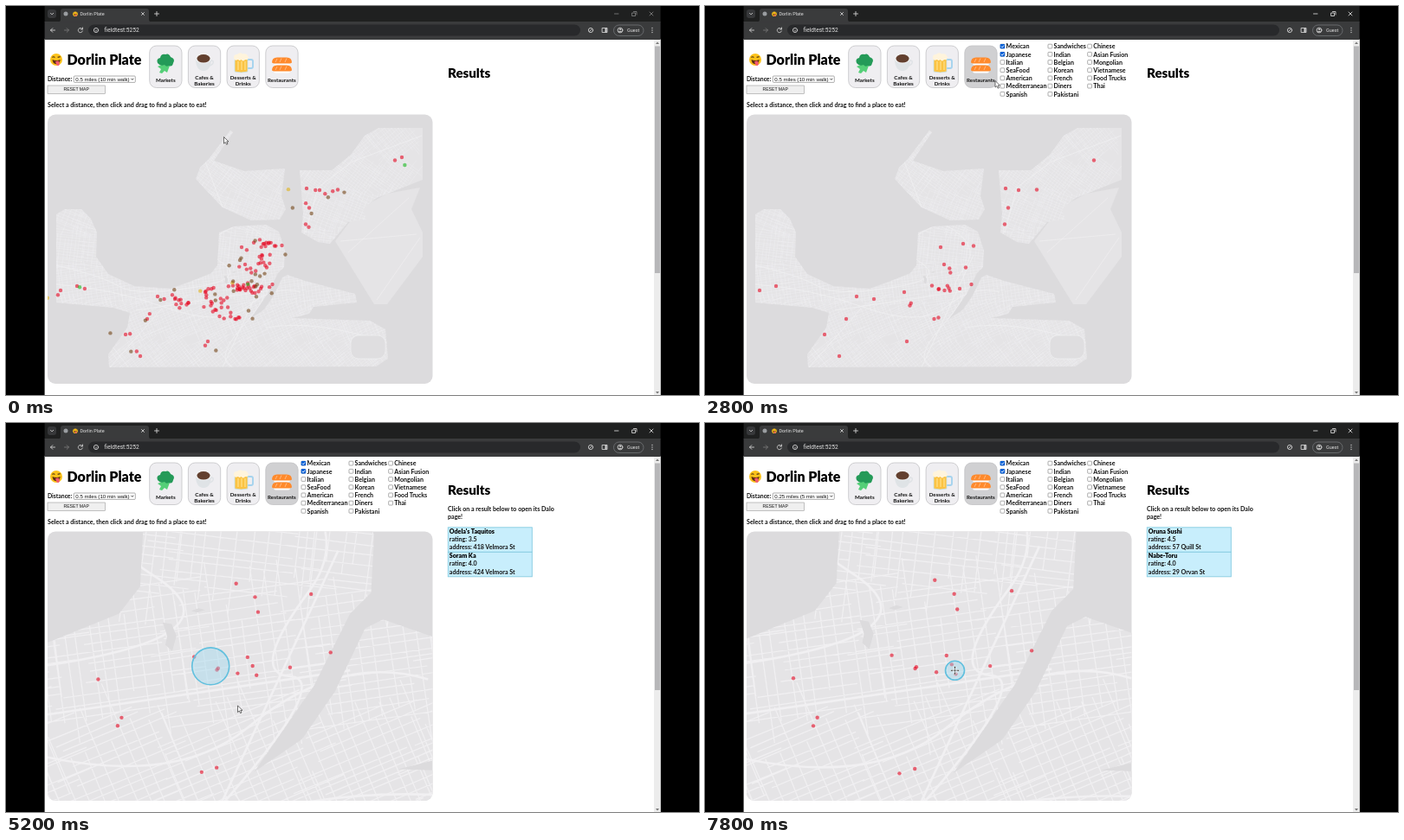
Animation, 800 px wide and 450 px high, one loop 8000 ms. Source, as an HTML page:

```html
<!DOCTYPE html>
<html lang="en">
<head>
<meta charset="utf-8">
<title>Dorlin Plate</title>
<style>
html, body { margin: 0; width: 100%; height: 100%; overflow: hidden; background: #000; }
svg { display: block; width: 100%; height: 100%; }
text { font: 700 7.1px Lato, sans-serif; fill: #111; white-space: pre; }
.head { font-weight: 900; fill: #000; }
.title { font-size: 16px; }
.results { font-size: 15.1px; }
.card { font-size: 6.2px; text-anchor: middle; }
.sys { font: 400 6.1px "Liberation Sans", Arial, sans-serif; }
.reset { font-size: 5.1px; text-anchor: middle; }
.bar { font: 400 5.5px Roboto, sans-serif; fill: #e3e3e3; }
.url { font-size: 6.6px; }
.line { fill: none; stroke: #d0d0d0; stroke-width: .9; stroke-linecap: round; stroke-linejoin: round; }
.road { fill: none; stroke: #f1f0f2; stroke-linejoin: round; }
.land { fill: #e5e4e6; }
</style>
</head>
<body>
<svg viewBox="0 0 800 450">
  <defs>
    <clipPath id="frame"><rect x="48" y="125.5" width="444.5" height="311.5" rx="9"/></clipPath>
    <clipPath id="shore"><use href="#land"/></clipPath>
    <g id="face">
      <circle r="7" fill="#fcc21b"/>
      <path d="M-4.6-2.5q1.6-1.6 3 .2M1.6-2.6l3-.8" fill="none" stroke="#5b3a12" stroke-width="1.2"/>
      <path d="M-4.5 0Q0 2 4.8 0Q4 5.2 0 5.2T-4.5 0" fill="#5f3010"/>
      <path d="M-1 2.2q3-1.6 4.2 0l.7 3.2q-1.2 2.4-3.4 1.2z" fill="#f2596f"/>
    </g>
  </defs>

  <rect x="44.6" y="38" width="711" height="412" fill="#fff"/>
  <g id="chrome">
    <rect x="44.6" width="711" height="19" fill="#1f2020"/>
    <rect x="44.6" y="18" width="711" height="21" fill="#3a3b3c"/>
    <rect x="48" y="4" width="10" height="10" rx="3" fill="#37383a"/>
    <path d="M60 18.5q3 0 3-3V6q0-3 3-3h96q3 0 3 3v9.5q0 3 3 3z" fill="#3a3b3c"/>
    <circle cx="69" cy="9" r="2.5" fill="#9a9da1"/>
    <use href="#face" transform="translate(80 9.2)scale(.4)"/>
    <rect x="95" y="21.5" width="568" height="13" rx="6.5" fill="#28292b"/>
    <rect x="701.5" y="22" width="34.5" height="12.5" rx="6.2" fill="none" stroke="#85888c" stroke-width=".6"/>
    <g class="line">
      <path d="M51.5 8.3l1.6 1.6 1.6-1.6M156.5 7.5l3 3m0-3l-3 3M174 6.5v5m-2.5-2.5h5"/>
      <path id="controls" d="M702.5 9h4.5M723 8h3.5v3.5H723zM724.5 6.5h3.5v3.5M743 7l4 4m0-4l-4 4"/>
      <path d="M56.5 28h-5m2.3-2.3L51.5 28l2.3 2.3"/>
      <path d="M67.5 28h5m-2.3-2.3l2.3 2.3-2.3 2.3" stroke="#777"/>
      <path d="M88 26.500a2.600 2.600 0 1 0 .4 2.500M88.500 25v2h-2"/>
      <circle cx="104" cy="28" r="2.6"/><path d="M104 27.900v1.200"/>
      <circle cx="675" cy="28" r="2.6"/><path d="M673.5 29.5l3-3"/>
      <rect x="688.5" y="25.5" width="5.5" height="5"/><path d="M692.5 26v4" stroke-width="2"/>
      <circle cx="709" cy="28" r="2.9"/><circle cx="709" cy="27" r=".8"/><path d="M707.3 29.8q1.7-1.2 3.4 0"/>
      <path d="M746 25.5v.1m0 2.4v.1m0 2.4v.1" stroke-width="1.3"/>
    </g>
    <text class="bar" x="85.5" y="11.3">Dorlin Plate</text>
    <text class="bar url" x="113.5" y="30.3">fieldtest:5252</text>
    <text class="bar" x="717" y="30">Guest</text>
    <rect x="748" y="39" width="7.6" height="411" fill="#ececec"/>
    <rect x="749" y="46.5" width="6" height="262.5" fill="#b7b7b9"/>
    <path d="M750 44l2-2.5 2 2.5zM750 446l2 2.5 2-2.5z" fill="#777"/>
  </g>

  <use href="#face" x="58" y="62"/>
  <text class="head title" x="70.5" y="67.5">Dorlin Plate</text>
  <text class="head results" x="510" y="83">Results</text>
  <text x="48" y="87" style="font-size:6.8px">Distance:</text>
  <rect x="78.3" y="81" width="71" height="7.4" rx="1" fill="#fff" stroke="#777" stroke-width=".6"/>
  <text id="choice" class="sys" x="80.3" y="86.9"></text>
  <path d="M144.3 83.8l1.5 1.6 1.5-1.6" fill="none" stroke="#222" stroke-width=".8"/>
  <rect x="48" y="92" width="66.3" height="9.300" fill="#efefef" stroke="#999" stroke-width=".6"/>
  <text class="sys reset" x="81.2" y="98.4">RESET MAP</text>
  <text x="48" y="116.5">Select a distance, then click and drag to find a place to eat!</text>
  <g id="cards"></g>
  <g id="icons">
    <path d="M184 66l-9 4 4 3-2 4 3 1 3-3 3 2 3-8z" fill="#55cf78"/>
    <path d="M175 66q-2-5 3-6 1-5 6-4 4-2 6 3 6 2 3 7-1 5-5 3-3 2-5-1-5 2-8-2" fill="#249a58"/>
    <path d="M219 60h18q0 15-9 15t-9-15" fill="#dfe3e6"/>
    <path d="M236 63q5 0 2.5 4-2 2-4 2" fill="none" stroke="#dfe3e6" stroke-width="1.5"/>
    <ellipse cx="228" cy="60.5" rx="9" ry="6" fill="#f4f5f6"/><ellipse cx="228" cy="60.8" rx="7.6" ry="4.8" fill="#63402f"/>
    <path d="M278 62h5q2 0 2 2v6q0 2-2 2h-5" fill="none" stroke="#a5d3ee" stroke-width="1.9"/>
    <path d="M264 60h15v16q-7.5 2-15 0z" fill="#fbc343" stroke="#c5e3f4" stroke-width=".8"/>
    <path d="M268 64v10m4-10v10m4-10v10" stroke="#ffdc7c" stroke-width="1.5"/>
    <path d="M263 61q-1-5 4-5 3-3 6-.6 6-1.4 7 4.6-1 3-4 2-2 3-4.500 0-2 2-3.500 0-4 2-5-1" fill="#fff4dc"/>
    <g id="sushi">
      <rect x="309" y="64" width="19" height="4.5" rx="2.2" fill="#fff"/>
      <path d="M307 65.500q0-6 6-6h11q6 0 6 6l-2 1h-19z" fill="currentColor"/>
      <path d="M313 61l-2 4m7-4.500l-2 4.500m8-4.500l-2 4.500" stroke="#fff" stroke-opacity=".4"/>
    </g>
    <use href="#sushi" y="9" color="#e53935"/>
  </g>
  <g id="filters"></g>

  <g clip-path="url(#frame)">
    <rect x="48" y="125" width="445" height="313" fill="#dcdbdd"/>
    <g id="map">
      <path id="land" class="land" d="M58 241L68 235 87 235 98 246 105 262 104 290 118 310 148 324 190 327 215 318 237 309 244 300 246 262 263 255 300 253 315 261 322 283 321 302 314 309 302 333 282 362 298 351 309 335 319 314 325 311 345 318 403 333 405 343 355 348 350 356 330 361 420 364 438 374 441 408 427 417 119 418 118 403 140 372 143 355 124 349 58 343z
        M219 200L224 187 234 177 259 144 262 146 240 179 275 191 322 188 318 220 323 235 316 247 283 248 250 233 230 212z
        M339 190L376 190 398 172 414 150 430 141 481 141 481 201 428 222 412 235 416 247 395 250 374 275 360 273 341 262 343 240z"/>
      <path class="land" d="M413 232L440 217 478 210 468 235 481 262 481 290 440 345 425 345 380 272 395 252z"/>
      <path class="road" stroke-width=".6" d="M386 272L474 264M395 285L465 222M428 340L478 268"/>
      <g clip-path="url(#shore)">
        <path id="streets" class="road" stroke-width=".34"/>
        <path class="road" stroke-width=".75" d="M58 300Q110 312 130 324T215 326 248 296 262 256M58 322Q120 326 185 349T280 347 340 331M275 252Q320 275 300 302T294 330 272 372 268 420M120 418L180 350M300 372Q360 362 440 390M346 262L360 210 400 180 480 150M230 180L250 233M150 352L314 328M250 418L310 288"/>
        <path fill="#dcdbdd" d="M251.5 312l3 .5 1.6 4-1.4 5-2.3-2 .6-3zM261 308.2l2.5-1 2.2.6-2.7.9z"/>
        <rect x="398" y="381" width="40" height="27" rx="9" fill="#dfdee0" stroke="#f0eff1" stroke-width=".7"/>
      </g>
    </g>
    <g id="dots" fill-opacity=".58"></g>
    <circle id="reach" stroke="#62c0de" stroke-width="1.6"/>
  </g>

  <g id="hint"><text x="510" y="102.3">Click on a result below to open its Dalo</text><text x="510" y="111">page!</text></g>
  <g id="list"></g>
  <g id="menu"></g>
  <path id="arrow" d="M0 0v7.6l1.8-1.6 1.3 2.7 1.4-.7-1.3-2.6h2.3z" fill="#fff" stroke="#333" stroke-width=".7"/>
  <path id="cross" d="M0-5l1.7 2H.5V-.5H3v-1.2L5 0 3 1.7V.5H.5V3h1.2L0 5l-1.7-2h1.200V.5H-3v1.200L-5 0l2-1.700v1.200h2.500V-3h-1.200z" fill="#222" stroke="#fff" stroke-width=".6"/>
</svg>

<script>
const $ = id => document.getElementById(id);
const LOOP = 8000, STEP = 200, ZOOM = 3.55, HUB = [280.2, 345];
const put = (id, attrs) => { for (const k in attrs) $(id).setAttribute(k, attrs[k]); };
const show = (id, on) => put(id, { display: on ? 'inline' : 'none' });
const label = (x, y, s, cls = '') => `<text x="${x}" y="${y}" class="${cls}">${s}</text>`;
const mix = (a, b, p) => a.map((v, i) => v + (b[i] - v) * p);
const clamp = p => Math.min(1, Math.max(0, p));
const ease = p => p < .5 ? 4 * p ** 3 : 1 - 4 * (1 - p) ** 3;

let seed = 7;
const rnd = () => (seed = (seed * 16807) % 2147483647) / 2147483647;

$('sushi').setAttribute('color', '#ff8a2c');
$('cards').innerHTML = ['Markets', 'Cafes &amp;|Bakeries', 'Desserts &amp;|Drinks', 'Restaurants'].map((name, i) => {
  const x = 165.7 + i * 44.7, lines = name.split('|');
  return `<rect id="card${i}" x="${x}" y="46" width="37.3" height="48.5" rx="8" stroke="#c3c3c6" stroke-width=".8" fill="#efeef1"/>` +
    lines.map((s, j) => label(x + 18.6, (lines[1] ? 84.5 : 87.6) + j * 7.2, s, 'card')).join('');
}).join('');

const rowY = i => 46.7 + i * 9.2;
const cuisines = {
  341: 'Mexican,Japanese,Italian,SeaFood,American,Mediterranean,Spanish',
  396: 'Sandwiches,Indian,Belgian,Korean,French,Diners,Pakistani',
  441.7: 'Chinese,Asian Fusion,Mongolian,Vietnamese,Food Trucks,Thai'
};
const boxes = Object.entries(cuisines).map(([x, names]) => names.split(',').map((s, i) =>
  `<rect x="${x}" y="${rowY(i) - 2.5}" width="4.8" height="4.8" rx=".8" fill="#fff" stroke="#777" stroke-width=".6"/>` +
  label(+x + 6.6, rowY(i) + 2.6, s)).join('')).join('');
const tick = i => `<g id="tick${i}" transform="translate(340.7 ${rowY(i) - 2.8})">` +
  '<rect width="5.4" height="5.4" rx=".9" fill="#0b62d6"/><path d="M1.2 2.8L2.4 4l2-2.4" fill="none" stroke="#fff" stroke-width=".9"/></g>';
$('filters').innerHTML = boxes + tick(0) + tick(1);

const walks = ['0.25 miles (5 min walk)', '0.5 miles (10 min walk)', '1 mile (20 min walk)', '1.5 miles (30 min walk)'];
$('menu').innerHTML = '<rect x="79" y="88.6" width="70" height="30.4" fill="#fff" stroke="#777" stroke-width=".6"/>' +
  '<rect x="79.3" y="89" width="69.4" height="7.5" fill="#1967d2"/>' +
  walks.map((s, i) => `<text x="81" y="${94.8 + i * 7.45}" class="sys" style="fill:${i ? '#111' : '#fff'}">${s}</text>`).join('');

const found = {
  first: [["Odela's Taquitos", '3.5', '418 Velmora St'], ['Soram Ka', '4.0', '424 Velmora St']],
  second: [['Oruna Sushi', '4.5', '57 Quill St'], ['Nabe-Toru', '4.0', '29 Orvan St']],
  none: []
};
const listHtml = rows => rows.map(([name, rate, place], i) => {
  const y = 120.8 + i * 28.5;
  return `<rect x="510.3" y="${y}" width="97" height="28.5" fill="#c8eefc" stroke="#86cbe0" stroke-width=".9"/>` +
    label(511.8, y + 6.9, name, 'head') + label(511.8, y + 16, 'rating: ' + rate) + label(511.8, y + 25.3, 'address: ' + place);
}).join('');

// street grid tiles that turn slowly from north to south
function tile(cx, cy, size) {
  const a = (300 - cy) * .35 * Math.PI / 180, c = Math.cos(a), s = Math.sin(a);
  const at = (u, v) => `${(cx + u * c - v * s).toFixed(1)} ${(cy + u * s + v * c).toFixed(1)}`;
  const end = () => size * (.75 - rnd() * .5);
  let d = '';
  for (let v = -size / 2; v < size / 2; v += 2 + 2 * rnd())
    d += `M${at(-end(), v)}L${at(end(), v + rnd() - .5)}`;
  for (let u = -size / 2; u < size / 2; u += 3 + 3 * rnd())
    d += `M${at(u, -end())}L${at(u + rnd() - .5, end())}`;
  return d;
}
let streets = '';
for (let x = 70; x < 490; x += 42)
  for (let y = 155; y < 430; y += 42) streets += tile(x, y, 44);
put('streets', { d: streets });

// places that pass both cuisine filters, the rest is scattered around them
const kept = [[276, 299], [282.3, 303.5], [283.3, 308.5], [301, 302.5], [262, 323.5], [269.6, 327.8], [270, 327.3],
  [276.5, 329], [279.8, 323.6], [281.5, 326.5], [282.8, 329.6], [294, 327], [307.5, 322], [230, 331], [236.5, 346.5],
  [237.8, 343.8], [264.5, 362], [269.5, 360.5], [272, 279], [298, 275], [310, 277.5], [63, 329], [82, 324], [175, 336],
  [195, 339], [163, 362], [138, 380], [155, 405], [233, 388], [347, 211], [362, 213], [383, 212.5], [350, 233.5],
  [346, 252.5], [449, 178.5]];
const near = ([x, y], r) => {
  const a = rnd() * 2 * Math.PI, d = r * Math.sqrt(rnd());
  return [x + d * Math.cos(a), y + .6 * d * Math.sin(a)];
};
const dots = [];
const addDot = ([x, y], kind, fill = '#e6001c') => {
  const el = document.createElementNS('http://www.w3.org/2000/svg', 'circle');
  el.setAttribute('r', 2.2);
  el.setAttribute('fill', fill);
  $('dots').append(el);
  dots.push({ x, y, kind, el });
};
for (const p of kept) addDot(near(p, 11), 'food');
for (const hub of [[301, 274], [300, 296], [281, 326], [242, 334], [252, 355], [196, 342]])
  for (let i = 0; i < 9; i++) addDot(near(hub, 15), 'food');
kept.forEach((p, i) => addDot(p, i % 2 ? 'japanese' : 'mexican'));
for (let i = 0; i < 36; i++)
  addDot(near(kept[i % kept.length], 22), 'other', i % 8 === 5 ? '#e0b010' : i % 12 === 10 ? '#10b818' : '#704012');

const kinds = t => t < 1000 ? 'food mexican japanese other' : t < 2200 ? 'food mexican japanese'
  : t < 2600 ? 'mexican' : 'mexican japanese';

// pointer stops: time, x, y
const stops = [[0, 251.5, 151.5], [1000, 318, 70], [1800, 347.5, 44], [2200, 343, 46], [2600, 343, 55], [2800, 335, 86.5],
  [3600, 281, 324], [4200, 281, 324], [4600, 267.5, 327], [5200, 267.5, 327], [6000, 116, 85], [6400, 110.5, 89.5],
  [6600, 110.5, 91], [7800, 288.5, 286.3], [LOOP, 288.5, 286.3]];
function pointerAt(t) {
  const i = Math.max(1, stops.findIndex(s => s[0] >= t)), a = stops[i - 1], b = stops[i];
  return mix(a, b, (t - a[0]) / (b[0] - a[0])).slice(1);
}

function draw(t) {
  const k = ZOOM ** ease(clamp((t - 4578) / 750));
  const place = p => mix(HUB, p, k);
  put('map', { transform: `translate(${HUB})scale(${k})translate(${-HUB[0]} ${-HUB[1]})` });

  const on = kinds(t).split(' ');
  for (const { x, y, kind, el } of dots) {
    const [cx, cy] = place([x, y]);
    el.setAttribute('cx', cx);
    el.setAttribute('cy', cy);
    el.setAttribute('display', on.includes(kind) ? 'inline' : 'none');
  }

  const filtered = t >= 1000, searched = t >= 3600, again = t >= 7400;
  const pointer = pointerAt(t);
  const [cx, cy] = again ? pointer : place(mix([280, 317], [267.5, 326.6], clamp((t - 4200) / 400)));
  put('reach', { cx, cy, r: (again ? 3.1 : 6.2) * k, fill: t < 4600 ? 'rgba(125,195,230,.8)' : 'rgba(155,215,238,.42)' });
  show('reach', searched);

  put('controls', { opacity: filtered ? 1 : .5 });
  put('card3', { fill: filtered ? '#d0d0d2' : '#efeef1' });
  show('filters', filtered);
  show('tick0', t >= 2200);
  show('tick1', t >= 2600);
  show('menu', t >= 6200 && t < 6600);
  $('choice').textContent = walks[t < 6600 ? 1 : 0];
  show('hint', searched);
  $('list').innerHTML = listHtml(found[t >= 7800 ? 'second' : t >= 4600 && !again ? 'first' : 'none']);

  const moving = again || (searched && t < 4600);
  show('arrow', !moving);
  show('cross', moving);
  put(moving ? 'cross' : 'arrow', { transform: `translate(${pointer})` });
}

const start = performance.now();
let last = -1;
(function loop() {
  const t = Math.floor((performance.now() - start) % LOOP / STEP) * STEP;
  if (t !== last) draw(last = t);
  requestAnimationFrame(loop);
})();
</script>
</body>
</html>
```
